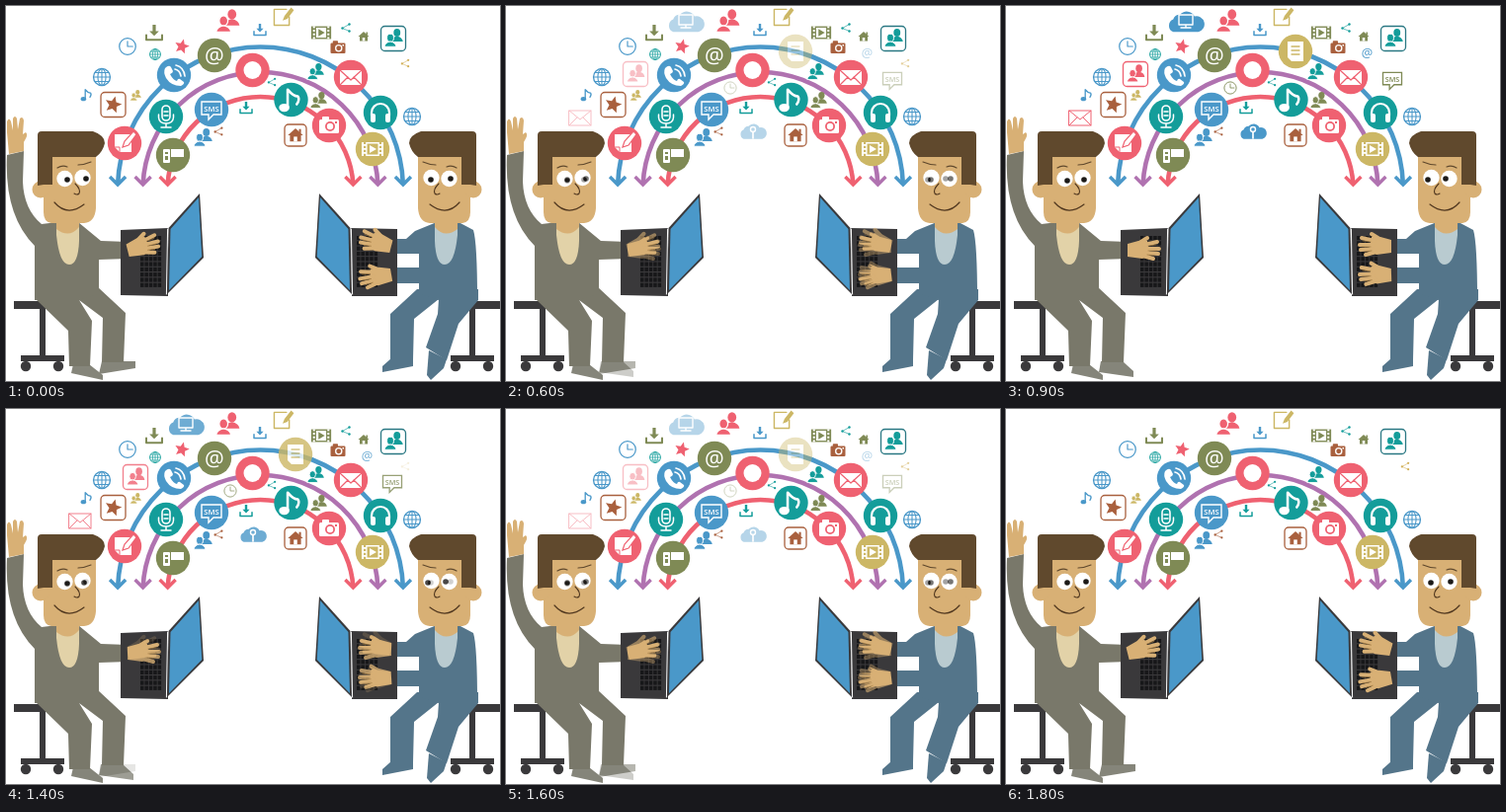
An HTML page that plays this animation: 500x380 px, repeating every 2300 ms.

```html
<!DOCTYPE html>
<html lang="en">
<head>
<meta charset="utf-8">
<title>Two people chatting</title>
<style>
html, body { margin: 0; width: 100%; height: 100%; overflow: hidden; background: #fff; }
svg { position: absolute; left: 0; top: 0; width: 500px; height: 380px; }
text { font-family: "Open Sans", Arial, sans-serif; text-anchor: middle; }
</style>
</head>
<body>
<script>
const PINK = '#ef6171', BLUE = '#4a98c9', TEAL = '#149d9a', OLIVE = '#7f8a55',
  GOLD = '#ccb765', BROWN = '#a9603e', PURPLE = '#b072b0', SKIN = '#d8b075',
  HAIR = '#60492d', DARK = '#3a393b';

const path = (d, fill, extra = '') => `<path d="${d}" fill="${fill}" ${extra}/>`;
const line = (d, color, width) =>
  path(d, 'none', `stroke="${color}" stroke-width="${width}" stroke-linecap="round" stroke-linejoin="round"`);
const dot = (x, y, r, fill) => `<circle cx="${x}" cy="${y}" r="${r}" fill="${fill}"/>`;
const rect = (x, y, w, h, fill, r = 0) =>
  `<rect x="${x}" y="${y}" width="${w}" height="${h}" rx="${r}" fill="${fill}"/>`;
const ring = (x, y, r, color, w) =>
  `<circle cx="${x}" cy="${y}" r="${r}" fill="none" stroke="${color}" stroke-width="${w}"/>`;
const mirror = (sum, inner) => `<g transform="translate(${sum} 0) scale(-1 1)">${inner}</g>`;

// Every glyph is centred on 0,0 in a box about 20 units wide.
const C = 'currentColor';
const bust = (x, y) => `<ellipse cx="${x}" cy="${y - 4}" rx="4.6" ry="5.4" fill="${C}"/>` +
  path(`M${x - 8} ${y + 8}Q${x - 7} ${y + 2} ${x} ${y + 1}Q${x + 7} ${y + 2} ${x + 8} ${y + 8}Z`, C);
const filmHoles = bg => [-6, -2, 2, 6].map(y =>
  rect(-9, y - 1.2, 2.2, 2.2, bg) + rect(6.8, y - 1.2, 2.2, 2.2, bg)).join('');
const glyphs = {
  people: bg => bust(5, -4) + `<g stroke="${bg}" stroke-width="1.3">${bust(-4, 3)}</g>`,
  note: () => line('M4 -8H-9V9H7V0', C, 1.5) + path('M0 4L2 -1L9 -10L12 -7L5 2Z', C),
  sheet: bg => path('M-10 -9H7V9H-5L-10 4Z', C) + path('M-2 4L0 -2L9 -12L12 -9L4 2Z', C, `stroke="${bg}" stroke-width="1.2"`) +
    line('M-10 4H-5V9', bg, 1),
  phone: () => path('M-9 -7Q-5 -11 -3 -8L-1 -4Q-1 -2 -4 -1Q-1 5 3 6Q4 3 6 4L10 7Q11 9 7 11Q-3 11 -8 3Q-11 -3 -9 -7Z', C) +
    line('M1 -6Q6 -5 7 1M2 -10Q10 -8 11 1', C, 1.7),
  at: () => `<text y="7.5" font-size="22" fill="${C}">@</text>`,
  disc: () => dot(0, 0, 9, C),
  mic: bg => `<rect x="-4" y="-11" width="8" height="15" rx="4" fill="${bg}" stroke="${C}" stroke-width="1.6"/>` +
    line('M-7.5 -2V1Q-7 7 0 7T7.5 1V-2M0 7V11M-5 11H5M-2 -5H2M-2 -1H2', C, 1.5),
  sms: bg => path('M-10 -8H10V5H2L-3 10V5H-10Z', bg, `stroke="${C}" stroke-width="1.4"`) +
    `<text y="1.8" font-size="7.6" font-weight="600" fill="${C}">SMS</text>`,
  camcorder: bg => rect(-10, -6, 7, 14, C, 1) + rect(-2, -6, 13, 8, C) + rect(-8, -3, 3, 2, bg) + rect(-8, 1, 3, 4, bg),
  music: () => line('M-3 6V-9Q2 -3 6 -3Q8 0 5 4', C, 2.2) +
    `<ellipse cx="-6" cy="7" rx="4.6" ry="3.6" fill="${C}"/>`,
  camera: bg => rect(-10, -6, 20, 14, C, 1.5) + rect(-7, -9, 7, 4, C, 1) +
    dot(1, 1, 5, bg) + dot(1, 1, 3.2, C) + rect(6, -4, 2, 2, bg),
  mail: bg => rect(-11, -7, 22, 15, C) + line('M-11 -7L0 3L11 -7M-11 8L-3 0M11 8L3 0', bg, 1.2),
  envelope: () => line('M-11 -7H11V8H-11ZL0 2L11 -7M-11 8L-3 0M11 8L3 0', C, 1),
  headphones: () => line('M-9 3V0A9 9 0 0 1 9 0V3', C, 2.2) + rect(-10, 1, 5, 9, C, 2) + rect(5, 1, 5, 9, C, 2),
  film: bg => rect(-11, -7, 22, 14, C) + filmHoles(bg) + rect(-5.5, -5.5, 11, 11, bg) + path('M-3 -4L4 0L-3 4Z', C),
  page: bg => path('M-8 -10H8V10H-4L-8 6Z', C) + line('M-4 -5H4M-4 -1H4M-4 3H4', bg, 1.3),
  download: () => path('M-2 -10H2V-2H6L0 4L-6 -2H-2Z', C) + line('M-10 3V9H10V3', C, 2.5),
  clock: () => ring(0, 0, 9.4, C, 1.4) + line('M0 -6V0H6', C, 1.3),
  globe: () => ring(0, 0, 9.4, C, 1.5) + `<ellipse rx="4.5" ry="9.4" fill="none" stroke="${C}" stroke-width="1.2"/>` +
    line('M-9 0H9M0 -9V9M-7.5 -5H7.5M-7.5 5H7.5', C, 1.2),
  star: () => path([...Array(10)].map((_, i) => {
    const r = i % 2 ? 5 : 11, a = i * Math.PI / 5;
    return (i ? 'L' : 'M') + (r * Math.sin(a)).toFixed(1) + ' ' + (-r * Math.cos(a)).toFixed(1);
  }).join('') + 'Z', C),
  share: () => line('M7 -7L-7 1L7 7', C, 1.3) + dot(7, -7, 2.4, C) + dot(-7, 1, 2.4, C) + dot(7, 7, 2.4, C),
  house: bg => path('M0 -10L11 0H8V9H-8V0H-11Z', C) + rect(-2.5, 2, 5, 7, bg) + rect(5, -9, 3, 6, C),
  cloud: () => path('M-13 10A7 7 0 0 1 -13 -3A7 7 0 0 1 -6 -8A9 9 0 0 1 9 -6A8 8 0 0 1 13 10Z', C)
};

const glyph = (name, x, y, scale, color, bg = '#fff', turn = 0) =>
  `<g transform="translate(${x} ${y}) rotate(${turn}) scale(${scale})" color="${color}">${glyphs[name](bg)}</g>`;
const badge = (name, x, y, color, scale = 1) => dot(x, y, 17.2, color) + glyph(name, x, y, scale, '#fff', color);
const boxed = (name, x, y, size, frame, scale, color, turn = 0) =>
  `<rect x="${x - size / 2}" y="${y - size / 2}" width="${size}" height="${size}" rx="4" fill="#fff" stroke="${frame}" stroke-width="1.3"/>` +
  glyph(name, x, y, scale, color, '#fff', turn);

// A half circle about (257.5, 186) whose ends carry arrow heads.
const arc = (r, color) => {
  const half = Math.sqrt(r * r - 25), left = 257.5 - half, right = 257.5 + half;
  const head = x => `M${x - 8} 173L${x} 181L${x + 8} 173`;
  return path(`M${left} 181A${r} ${r} 0 0 1 ${right} 181`, 'none', `stroke="${color}" stroke-width="4.6"`) +
    path(head(left) + head(right), 'none', `stroke="${color}" stroke-width="3.4"`);
};

const icons = () => [
  arc(144.5, BLUE), arc(119, PURPLE), arc(94, PINK),
  badge('sheet', 120, 139, PINK), badge('phone', 170, 70, BLUE), badge('at', 211, 50, OLIVE),
  badge('disc', 249.5, 65, PINK), badge('mic', 162, 112, TEAL), badge('sms', 208, 105, BLUE),
  badge('camcorder', 169, 151, OLIVE), badge('music', 288.5, 95, TEAL, 1.15), badge('camera', 327, 121, PINK),
  badge('mail', 349, 72, PINK), badge('headphones', 379, 108, TEAL), badge('film', 371, 145, GOLD),
  glyph('people', 224, 16, .95, PINK), glyph('note', 280, 11, .95, GOLD), glyph('download', 150, 27, .8, OLIVE),
  glyph('clock', 123, 41, .88, BLUE), glyph('globe', 151, 49, .58, TEAL), glyph('star', 178, 41, .7, PINK, '', 14),
  glyph('globe', 97, 72, .9, BLUE), glyph('music', 82, 90, .6, BLUE), boxed('star', 108.5, 100, 25, BROWN, .8, BROWN, 14),
  glyph('people', 131, 91, .45, GOLD), glyph('download', 257, 24, .6, BLUE), glyph('film', 319, 27, .92, OLIVE),
  glyph('share', 344, 22, .5, TEAL), glyph('camera', 336, 42, .75, BROWN), glyph('house', 362, 31, .5, OLIVE),
  boxed('people', 392, 33, 25, '#2a7883', .75, TEAL), glyph('people', 313, 67, .68, TEAL),
  glyph('share', 269, 77, .45, TEAL), glyph('people', 316, 96, .68, OLIVE), glyph('download', 243, 103, .6, TEAL),
  glyph('people', 199, 134, .75, BLUE), glyph('share', 215, 127, .48, BROWN),
  boxed('house', 293, 131, 22, BROWN, .7, BROWN), glyph('globe', 411, 112, .9, BLUE)
].join('');

const extras = () => [
  glyph('cloud', 182, 16.5, .98, BLUE) + line('M175 9H189V19H175ZM182 19V22M177 22H187', '#fff', 1.4),
  badge('page', 293, 46, GOLD), boxed('people', 131, 69, 25, PINK, .72, PINK),
  glyph('envelope', 75, 113, 1, PINK), glyph('clock', 227, 83, .65, OLIVE),
  glyph('at', 365.5, 47.5, .58, BLUE), glyph('sms', 391, 75, .95, OLIVE),
  glyph('cloud', 250, 127.5, .72, BLUE) + ring(250, 125, 2.5, '#fff', 1.4) + line('M250 128V134', '#fff', 1.7)
].join('');

const chair = (seat, post) => rect(seat, 299, 45, 8, DARK) + rect(post, 306, 6, 50, DARK) +
  rect(post - 19, 354, 44, 6, DARK) + dot(post - 14, 365, 5.2, DARK) + dot(post + 19, 365, 5.2, DARK);

const head = (pupils, shirt) => path('M51 218H74V238Q73 262 64 262Q54 262 51 232Z', shirt) +
  path('M51 210H74V224Q64 236 51 226Z', SKIN) +
  path('M42 150H91V205Q90 219 79 220H46Q38 219 38 209V170Z', SKIN) +
  `<ellipse cx="35" cy="186" rx="8.5" ry="8.5" fill="${SKIN}"/>` +
  path('M32 182V131Q32 127 36 127H88Q100 131 100 139Q98 148 91 153H47V181H38Z', HAIR) +
  dot(59.5, 175, 8.2, '#fff') + dot(77.5, 174, 8.2, '#fff') +
  pupils.map(([x, y]) => dot(x, y, 2.8, '#1c1a18')).join('') +
  line('M52 164Q57 161 62 163M73 161Q79 161 86 158', HAIR, 1.2) +
  line('M70 180Q76 186 74 190Q72 192 69 190', '#50371f', 1.1) +
  line('M49 199Q62 214 79 201', '#50371f', 1.2);

// Fingers point right; the wrist sits at 0,0.
const hand = (x, y, turn, flip = 1) => `<g transform="translate(${x} ${y}) scale(${flip} 1) rotate(${turn})">` +
  path('M-1 -6L10 -9H19L22 5L14 9L-1 7Z', SKIN) +
  line('M11 -7L19 -12M16 -5L29 -8M17 -1H31M17 3L30 4M14 6L25 9', SKIN, 4) +
  line('M20 -4L28 -5M20 1H29M19 5L26 6', '#9b763f', .7) + '</g>';

const keys = x => [...Array(10)].map((_, r) => [...Array(5)].map((_, c) =>
  rect(x + c * 4.4, 233 + r * 5.3, 3.5, 4.2, '#171719')).join('')).join('');
const screen = path('M163 292L164.5 225L196 190L200 255Z', DARK) + path('M165 288L166.5 226L195 194L198.3 254Z', BLUE) +
  line('M163.6 226L162.4 292', '#fff', 1);

const leftMan = pose => {
  const suit = '#79786a', shoe = '#85857a';
  return chair(8, 34) +
    path(pose.shoe, shoe) + path('M68 363H84L98 374V379L66 372Z', shoe) +
    path('M29 296L36 284H92L121 311L119 361H97L98 316L74 298L87 319L85 365H64L63 329Z', suit) +
    path('M1 151L18 147L17 178Q18 206 36 221L52 219H73L96 238L124 239V256L94 257V292L74 298H29V243Q-2 212 1 151Z', suit) +
    path('M3 150L1 128V117Q3 112 5 117L7 126V114Q9 110 11 114L12 125L14 114Q17 111 18 116L17 130L20 128Q23 130 18 138V147Z', SKIN) +
    head(pose.leftEyes, '#e2d2a8') +
    path('M116 227L164 225V294L116 293Z', DARK) + keys(136) + screen + hand(124, 247, pose.turns[0]);
};

const rightMan = pose => {
  const suit = '#54758a';
  return chair(455, 469) +
    path('M390 357H412V365L381 371V365Z', suit) + path('M428 349L446 358L443 367L430 379L426 374Z', suit) +
    path('M416 287H478V298L458 322L446 359L425 346L437 312L438 297L413 317L412 358H389V312Z', suit) +
    path('M414 228L436 219H458L473 227Q477 240 477 298H438L418 292V281H389V265H418V251H389V236H405Z', suit) +
    mirror(508, head(pose.rightEyes.map(([x, y]) => [508 - x, y]), '#b9cbd0')) +
    path('M349 225L396 226V294L350 294Z', DARK) + keys(355) + mirror(513, screen) +
    hand(389, 243, pose.turns[1], -1) + hand(389, 272, pose.turns[2], -1);
};

const poses = [
  { turns: [-14, -14, 10], leftEyes: [[62, 176], [81, 175]], rightEyes: [[430, 176], [450, 175]],
    shoe: 'M97 360H131V367L94 373Z' },
  { turns: [0, 0, 2], leftEyes: [[62, 177], [79, 176]], rightEyes: [[427, 176], [445, 175]],
    shoe: 'M96 360H118L129 370V376L94 371Z' }
];

const scene = (pose, withExtras) => '<svg viewBox="0 0 500 380">' + rect(0, 0, 500, 380, '#fff') +
  icons() + (withExtras ? extras() : glyph('share', 404, 58, .45, '#d2b058')) +
  leftMan(pose) + rightMan(pose) + '</svg>';

document.body.insertAdjacentHTML('beforeend', scene(poses[0], false) + scene(poses[1], true));
const overlay = document.querySelectorAll('svg')[1];

// The second pose dissolves in and out in hard steps of 100 ms.
const mix = t => {
  if (t < 500 || t >= 1800) return 0;
  if (t < 900) return Math.floor(t / 100 - 4) / 5;
  if (t < 1400) return 1;
  return (18 - Math.floor(t / 100)) / 5;
};
const start = performance.now();
const draw = () => {
  overlay.style.opacity = mix(Math.max(0, performance.now() - start) % 2300);
  requestAnimationFrame(draw);
};
draw();
</script>
</body>
</html>
```
